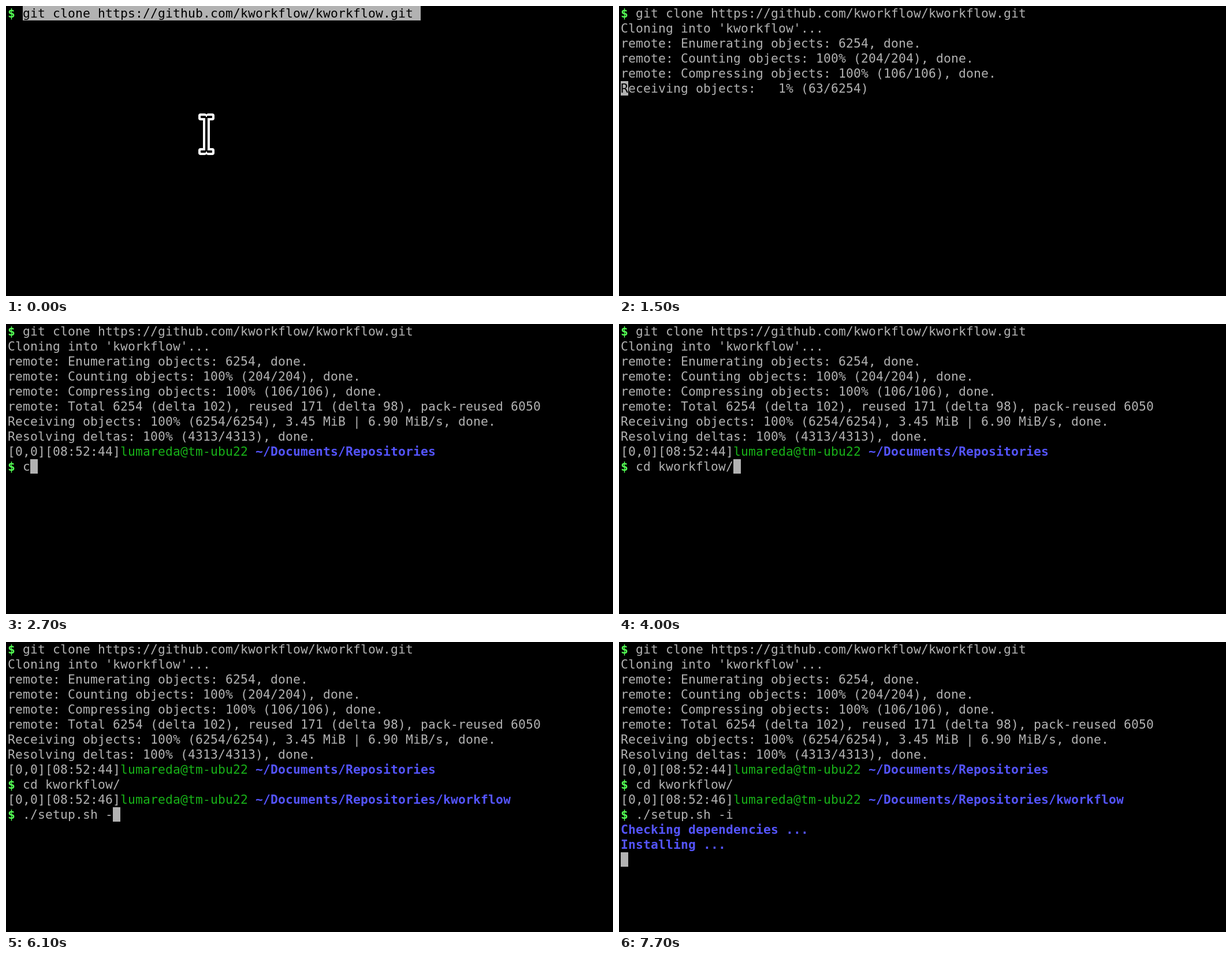
Animation, 1051 px wide and 502 px high, one loop 8 s. Source, as an HTML page with a canvas:

```html
<!DOCTYPE html>
<html lang="en">
<head>
<meta charset="utf-8">
<title>Terminal session</title>
<style>
  html, body { margin: 0; width: 100%; height: 100%; overflow: hidden; background: #000; }
  canvas { display: block; }
</style>
</head>
<body>
<canvas id="terminal" width="1051" height="502"></canvas>
<script>
const ctx = document.getElementById('terminal').getContext('2d');
const LOOP = 8000;
const CELL = { left: 3, width: 13, height: 26, baseline: 20, cursor: 25 };
const GREY = '#b2b2b2', GREEN = '#18b218', LIME = '#54ff54', BLUE = '#5454ff';

// A line is a list of runs: [text, color, bold].
const plainLine = text => [[text, GREY]];
const statusLine = text => [[text, BLUE, true]];
const commandLine = text => [['$', LIME, true], [' ' + text, GREY]];
const pathLine = (clock, path) => [
  [`[0,0][${clock}]`, GREY], ['lumareda@tm-ubu22', GREEN], [' ', GREY], [path, BLUE, true]
];
const progressLine = (label, percent, total) => plainLine(
  `${label}: ${String(percent).padStart(3)}% (${Math.ceil(percent * total / 100)}/${total})`);

const CLONE = 'git clone https://github.com/kworkflow/kworkflow.git';
const HOME = '~/Documents/Repositories';

// Latest value in a list of [time, value] steps.
const latest = (steps, t) => steps.filter(([start]) => start <= t).at(-1)[1];

const RECEIVED = [[1500, 1], [1600, 29], [1700, 46], [1900, 78]];
const CD_TYPED = [[2100, ''], [2700, 'c'], [2900, 'cd'], [3400, 'cd '], [3600, 'cd k'],
  [3800, 'cd kw'], [4000, 'cd kworkflow/']];
const SETUP_TYPED = [[4400, ''], [5000, '.'], [5200, './'], [5400, './s'], [5500, './se'],
  [5700, './setup.sh '], [6100, './setup.sh -'], [6400, './setup.sh -i']];

function screenAt(t) {
  const lines = [commandLine(CLONE)];
  const print = (...added) => lines.push(...added);
  const view = (row = lines.length, col = 0) => ({ lines, row, col });
  const typing = text => {
    print(commandLine(text));
    return view(lines.length - 1, 2 + text.length);
  };
  const counting = (...args) => {
    print(progressLine(...args));
    return view(lines.length - 1);
  };

  if (t < 800) return view(0, 2 + CLONE.length);
  if (t < 900) return view();
  print(plainLine("Cloning into 'kworkflow'..."));
  if (t < 1500) return view();

  print(plainLine('remote: Enumerating objects: 6254, done.'),
    plainLine('remote: Counting objects: 100% (204/204), done.'),
    plainLine('remote: Compressing objects: 100% (106/106), done.'));
  if (t >= 1900)
    print(plainLine('remote: Total 6254 (delta 102), reused 171 (delta 98), pack-reused 6050'));
  if (t < 2000) return counting('Receiving objects', latest(RECEIVED, t), 6254);
  print(plainLine('Receiving objects: 100% (6254/6254), 3.45 MiB | 6.90 MiB/s, done.'));
  if (t < 2100) return counting('Resolving deltas', 37, 4313);
  print(plainLine('Resolving deltas: 100% (4313/4313), done.'), pathLine('08:52:44', HOME));
  if (t < 4400) return typing(latest(CD_TYPED, t));

  print(commandLine('cd kworkflow/'), pathLine('08:52:46', HOME + '/kworkflow'));
  if (t < 6800) return typing(latest(SETUP_TYPED, t));

  print(commandLine('./setup.sh -i'), statusLine('Checking dependencies ...'));
  if (t >= 7700) print(statusLine('Installing ...'));
  return view();
}

function drawLine(runs, row, isInverse) {
  let col = 0;
  for (const [text, color, bold] of runs) {
    ctx.font = `${bold ? 'bold ' : ''}21.33px "DejaVu Sans Mono", monospace`;
    for (const char of text) {
      ctx.fillStyle = isInverse(col) ? '#000' : color;
      ctx.fillText(char, CELL.left + col * CELL.width, row * CELL.height + CELL.baseline);
      col++;
    }
  }
}

function drawPointer() {
  const box = (x, y, w, h, r) => {
    ctx.beginPath();
    ctx.roundRect(x, y, w, h, r);
    ctx.fill();
  };
  ctx.fillStyle = '#fff';
  for (const y of [186, 246]) {
    box(333, y, 14.5, 12, 4);
    box(346.5, y, 14.5, 12, 4);
  }
  box(341, 192, 12, 60, 0);
  ctx.fillStyle = '#000';
  for (const y of [190, 250]) {
    box(337, y, 9, 4, 1);
    box(348, y, 9, 4, 1);
  }
  box(345, 192, 4, 60, 0);
}

function draw(t) {
  const { lines, row, col } = screenAt(t);
  const selected = t < 800;
  const first = selected ? 2 : col;

  ctx.fillStyle = '#000';
  ctx.fillRect(0, 0, 1051, 502);
  ctx.fillStyle = GREY;
  ctx.fillRect(CELL.left + first * CELL.width, row * CELL.height,
    (col - first + 1) * CELL.width, CELL.cursor);
  lines.forEach((runs, i) => drawLine(runs, i, c => i === row && c >= first && c <= col));
  if (selected) drawPointer();
}

const start = performance.now();
function tick() {
  draw((performance.now() - start) % LOOP);
  requestAnimationFrame(tick);
}
tick();
</script>
</body>
</html>
```
